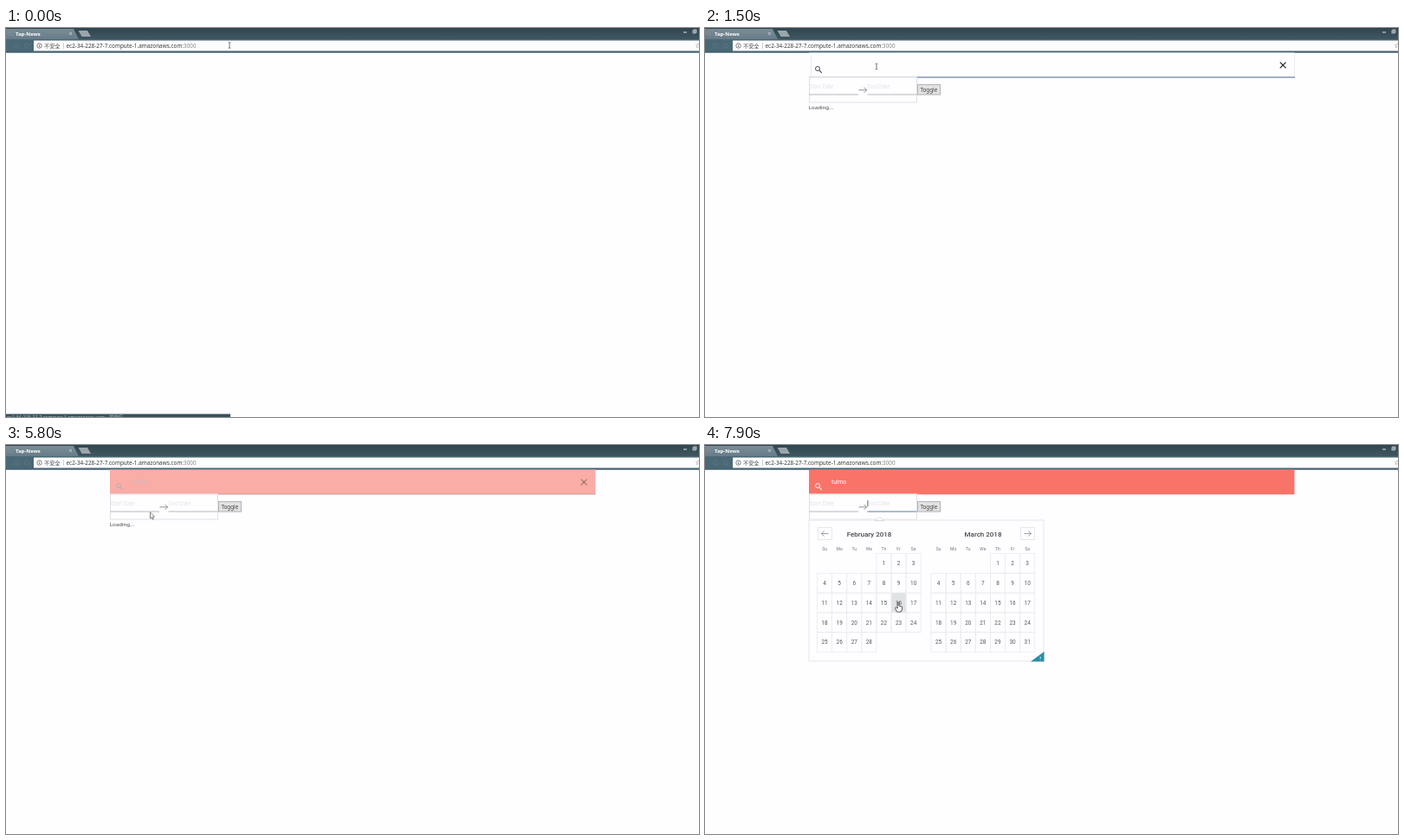
These frames come from a looping animation (800 px wide and 450 px high, 8 s). An HTML page with a canvas:

```html
<!DOCTYPE html>
<html lang="en">
<head>
<meta charset="utf-8">
<title>News search</title>
<style>
html, body { margin: 0; width: 100%; height: 100%; overflow: hidden; background: #fefdff; }
canvas { display: block; width: 800px; height: 450px; }
</style>
</head>
<body>
<canvas width="800" height="450"></canvas>
<script>
const ctx = document.querySelector('canvas').getContext('2d');
const LOOP = 8000, STEP = 100;
const PAGE = '#fefdff', RED = [248, 116, 104], WHITE = [254, 253, 255], DARK = [60, 60, 60];
const UI = '"Noto Sans", "Noto Sans CJK SC", sans-serif', ROBOTO = 'Roboto, sans-serif';
const HOST = 'ec2-34-228-27-7.compute-1.amazonaws.com';
const QUERY = 'tulmo';
const TYPED_AT = [2000, 2400, 3000, 3500, 4000];
const SHOW_PAGE = 300, SHOW_LIST = 2000, BLUR = 5500, OPEN = 6400, PICK = 7700;

// Pointer stops: time, x, y
const PATH = [[100, 258, 20], [500, 163, 44], [900, 198, 44.5], [1800, 198, 44.5], [2200, 196, 45],
  [5000, 196, 45], [5600, 166.5, 77.8], [6000, 166.5, 77.8], [6300, 150, 69], [6800, 150, 69], [7500, 223, 182]];

const clamp = v => Math.max(0, Math.min(1, v));
const ramp = (t, from, to) => clamp((t - from) / (to - from));
const smooth = v => v * v * (3 - 2 * v);
const mix = (a, b, k) => `rgb(${a.map((v, i) => Math.round(v + (b[i] - v) * k))})`;

function rect(x, y, w, h, fill) {
  ctx.fillStyle = fill;
  ctx.fillRect(x, y, w, h);
}
function box(x, y, w, h, stroke, fill = PAGE) {
  rect(x, y, w, h, fill);
  ctx.strokeStyle = stroke;
  ctx.lineWidth = 1;
  ctx.strokeRect(x + .5, y + .5, w - 1, h - 1);
}
function shape(points, fill, stroke, width = 1) {
  ctx.beginPath();
  points.forEach(([x, y]) => ctx.lineTo(x, y));
  if (fill) { ctx.closePath(); ctx.fillStyle = fill; ctx.fill(); }
  if (stroke) { ctx.strokeStyle = stroke; ctx.lineWidth = width; ctx.stroke(); }
}
const line = (x1, y1, x2, y2, color, width) => shape([[x1, y1], [x2, y2]], null, color, width);
function ring(x, y, r, color, width = .8) {
  ctx.beginPath();
  ctx.arc(x, y, r, 0, 7);
  ctx.strokeStyle = color;
  ctx.lineWidth = width;
  ctx.stroke();
}
function cross(x, y, r, color, width) {
  line(x - r, y - r, x + r, y + r, color, width);
  line(x - r, y + r, x + r, y - r, color, width);
}
function fade(y1, y2, from, to) {
  const g = ctx.createLinearGradient(0, y1, 0, y2);
  g.addColorStop(0, from);
  g.addColorStop(1, to);
  return g;
}
function text(s, x, y, size, color, { family = UI, weight = 400, align = 'left' } = {}) {
  ctx.font = `${weight} ${size}px ${family}`;
  ctx.textAlign = align;
  ctx.fillStyle = color;
  ctx.fillText(s, x, y);
  return ctx.measureText(s).width;
}
function arrow(x, y, dir, r, color) {
  line(x - r, y, x + r, y, color, .8);
  const tip = x + dir * r;
  shape([[tip - dir * 3, y - 3], [tip, y], [tip - dir * 3, y + 3]], null, color, .8);
}

function browser(loading) {
  rect(0, 0, 800, 13, fade(0, 13, '#30454f', '#405760'));
  rect(0, 13, 800, 15.5, '#4b6876');
  rect(0, 26.5, 800, 2, '#446371');
  shape([[0, 1], [78, 1], [84, 13], [0, 13]], fade(1, 13, '#7b8d97', '#667c88'));
  shape([[83.5, 3], [94, 3], [98, 10], [87.5, 10]], '#9ba6ac');
  ring(4, 6.5, 2, loading ? '#8294b0' : '#80919a', .7);
  text('Tap-News', 11, 8.6, 6, '#fff', { weight: 600 });
  cross(74.5, 6.5, 1.5, '#e3e8ea', .7);
  line(782, 5, 786, 5, '#dde3e6');
  ring(12, 20.5, 2.6, '#5d7885');
  ring(24, 20.5, 2.6, '#5d7885');
  ctx.strokeStyle = '#cbd3d6';
  ctx.lineWidth = .8;
  ctx.strokeRect(793, 3, 3, 3);
  ctx.strokeRect(794, 2, 3, 3);
  rect(32, 14.5, 768, 12, '#fdfdfe');
  ring(38.5, 20.5, 2.7, '#4c4c4c', .7);
  rect(38.2, 20, .7, 2, '#444');
  rect(38.2, 18.8, .7, .7, '#444');
  text('不安全', 44, 22.8, 6.2, '#444');
  rect(66, 17, .7, 7, '#bbb');
  const w = text(HOST, 69.5, 22.8, 6.4, '#3c3c3c');
  text(':3000', 69.5 + w, 22.8, 6.3, '#858585');
  text('☆', 795.5, 23.3, 8, '#444', { family: '"DejaVu Sans", sans-serif' });
}

function statusBar() {
  rect(0, 446.5, 259, 4, '#38515c');
  text(HOST, 1, 452.4, 5.4, '#b5c2c8');
  text('的响应', 119, 452.4, 5.4, '#b5c2c8');
}

function dateField(label, x, focused, caret) {
  text(label, x + .5, 70, 6.4, '#d8d8da', { family: ROBOTO, weight: 300 });
  rect(x, 76.5, 57, 1, focused ? '#5f7f9c' : '#b9b9bb');
  if (caret) rect(x, 64, .8, 7, '#444');
}

function dates(t) {
  const open = t >= OPEN, onEnd = t >= PICK;
  box(120, 56.5, 125, 30, '#e0e0e2');
  dateField('Start Date', 120, open && !onEnd, false);
  dateField('End Date', 187.5, onEnd, onEnd);
  arrow(182, 71.8, 1, 4.6, '#777');
  box(245, 65, 27, 12.5, '#b4b4b4', '#e2e2e2');
  text('Toggle', 258.3, 73.6, 6.3, '#444', { align: 'center' });
  if (!open) text('Loading...', 119.8, 93.7, 6.15, '#444');
}

function search(t) {
  const focus = t < BLUR ? ramp(t, 1000, 1400) : 1 - ramp(t, 5400, 6080);
  const ink = mix([255, 255, 255], DARK, focus);
  rect(120, 28.5, 560.5, 28.7, mix(RED, WHITE, focus));
  if (focus > .9) {
    rect(122, 32, 1, 25, '#e9e8eb');
    rect(680, 30, .8, 27, '#e9e8eb');
  }
  ctx.globalAlpha = focus;
  rect(120, 56.5, 561, 1, t < SHOW_LIST ? '#4d6780' : '#7d8183');
  cross(667.2, 43, 3.4, '#222', 1.2);
  ctx.globalAlpha = 1;
  ring(130, 47, 2.5, ink, .9);
  line(131.8, 48.8, 134.8, 51.8, ink, 1.1);
  const typed = QUERY.slice(0, TYPED_AT.filter(at => t >= at).length);
  const w = text(typed, 146, 45.2, 6.7, mix([255, 255, 255], [110, 110, 110], focus), { family: ROBOTO });
  const caretOn = t >= 3000 && t < BLUR && Math.floor(t / 500) !== 9;
  if (caretOn) rect(146 + w, 39.5, .8, 7, '#555');
}

function suggestions() {
  rect(120, 57.5, 561, 11, PAGE);
  rect(120, 68.2, 561, .8, '#dcdcde');
  rect(680, 57, .8, 12, '#e5e5e7');
  text(QUERY, 123.5, 65.2, 5.5, '#222', { weight: 700 });
}

function month(name, left, days, firstDay, hover) {
  const colW = 17.1, rowH = 22.8, top = 125.5, center = { family: ROBOTO, align: 'center' };
  text(name, left + 60, 105.6, 8, '#484848', { ...center, weight: 500 });
  ['Su', 'Mo', 'Tu', 'We', 'Th', 'Fr', 'Sa'].forEach((d, i) =>
    text(d, left + (i + .5) * colW, 121.8, 5, '#777', center));
  for (let day = 1; day <= days; day++) {
    const slot = day + firstDay - 1;
    const x = left + slot % 7 * colW, y = top + Math.floor(slot / 7) * rowH;
    const over = hover.x >= x && hover.x < x + colW && hover.y >= y && hover.y < y + rowH;
    if (over) rect(x, y, colW, rowH, '#e0e3e3');
    ctx.strokeStyle = '#ebebed';
    ctx.lineWidth = .8;
    ctx.strokeRect(x, y, colW, rowH);
    text(day, x + colW / 2, y + 13.7, 6.4, '#565a5c', center);
  }
}

function calendar(t, pointer) {
  box(119.5, 86.5, 272, 164, '#e6e6e8');
  const tick = t >= PICK ? 201.5 : 134;
  shape([[tick - 5.5, 87.5], [tick, 83.5], [tick + 5.5, 87.5]], PAGE, '#d2d2d4', .8);
  [[130, -1], [364, 1]].forEach(([x, dir]) => {
    box(x, 95, 17, 15, '#e8e8ea');
    arrow(x + 8.5, 102.5, dir, 4, '#85898b');
  });
  month('February 2018', 129.5, 28, 4, pointer);
  month('March 2018', 261, 31, 4, pointer);
  shape([[376, 250.5], [391.5, 250.5], [391.5, 239]], '#2b8da8');
  text('?', 386, 249, 4.5, '#d8eef3', { weight: 700 });
}

function pointerAt(t) {
  const next = PATH.findIndex(p => p[0] > t);
  const b = PATH.at(next), a = next < 0 ? b : PATH[Math.max(0, next - 1)];
  const k = a === b ? 0 : smooth(ramp(t, a[0], b[0]));
  return { x: a[1] + (b[1] - a[1]) * k, y: a[2] + (b[2] - a[2]) * k };
}

function drawPointer({ x, y }, t) {
  ctx.save();
  ctx.translate(x, y);
  if (y < 77) {
    line(0, -3, 0, 3, '#555', .8);
    line(-1.4, -3.2, 1.4, -3.2, '#555', .7);
    line(-1.4, 3.2, 1.4, 3.2, '#555', .7);
  } else if (t >= OPEN && y > 125) {
    shape([[-.8, 0], [.8, 0], [.8, 4], [4.6, 5], [4.6, 8], [3.2, 11], [-1.5, 11], [-3.6, 6.5], [-2.6, 5.6], [-.8, 7], [-.8, 0]],
      '#fff', '#333', .8);
  } else {
    shape([[0, 0], [0, 7.2], [1.6, 5.8], [2.7, 8.4], [3.9, 7.9], [2.8, 5.4], [5, 5.2], [0, 0]], '#fff', '#555', .7);
  }
  ctx.restore();
}

function draw(now) {
  const t = Math.floor(now % LOOP / STEP) * STEP;
  const pointer = pointerAt(t);
  rect(0, 0, 800, 450, PAGE);
  browser(t < SHOW_PAGE);
  if (t < SHOW_PAGE) statusBar();
  else {
    search(t);
    dates(t);
    if (t >= SHOW_LIST && t < BLUR) suggestions();
    if (t >= OPEN) calendar(t, pointer);
  }
  drawPointer(pointer, t);
}

const start = performance.now();
function loop() {
  draw(performance.now() - start);
  requestAnimationFrame(loop);
}
loop();
</script>
</body>
</html>
```
